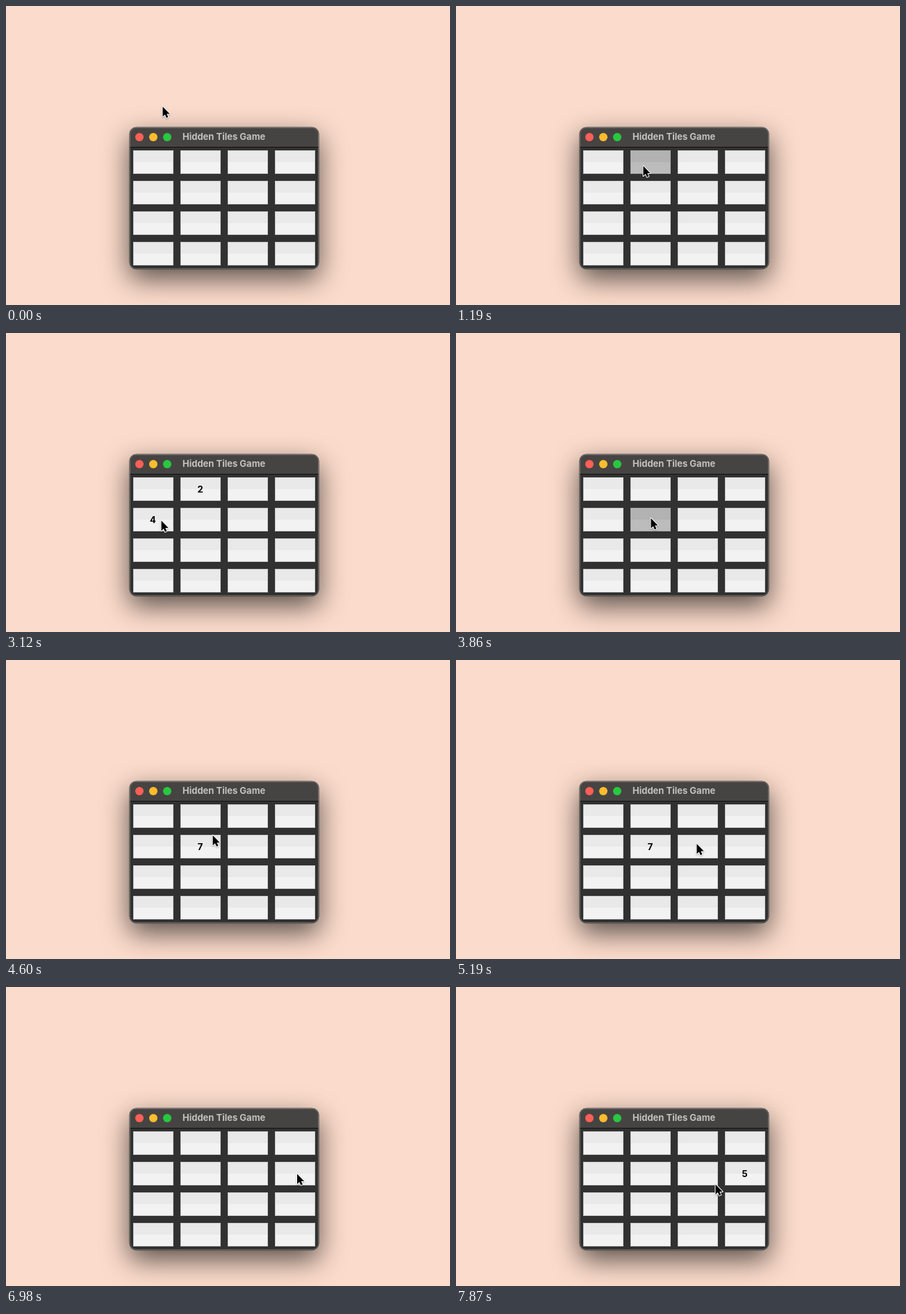
An HTML page with a canvas that plays this animation: 639x431 px, repeating every 8000 ms.

```html
<!DOCTYPE html>
<html lang="en">
<head>
<meta charset="utf-8">
<title>Hidden Tiles Game</title>
<style>
html, body { margin: 0; width: 100%; height: 100%; overflow: hidden; background: #fbdbcb; }
canvas { display: block; }
</style>
</head>
<body>
<canvas id="stage" width="639" height="431"></canvas>
<script>
const ctx = document.getElementById('stage').getContext('2d');
const LOOP = 8000, STEP = 148;
const FONT = 'bold 13px Inter, sans-serif';
const START = [225.5, 145];

// Pointer moves: start time, number of steps, target, upward bend
const moves = [
  { at: 600, steps: 4, to: [269.5, 230.5], bend: 0 },
  { at: 1640, steps: 4, to: [209.5, 271.5], bend: 0 },
  { at: 2830, steps: 7, to: [280.5, 267], bend: 0 },
  { at: 4450, steps: 6, to: [346.5, 265], bend: 18 },
  { at: 6530, steps: 4, to: [419, 269.5], bend: 0 },
  { at: 7870, steps: 1, to: [373.5, 284.5], bend: 0 }
];

// Clicked tiles: pressed, released showing a digit, then hidden again
const clicks = [
  { col: 1, row: 0, digit: 2, press: 1190, release: 1340, hide: 3130 },
  { col: 0, row: 1, digit: 4, press: 2230, release: 2380, hide: 3130 },
  { col: 1, row: 1, digit: 7, press: 3860, release: 4000, hide: 6240 },
  { col: 2, row: 1, digit: 3, press: 5340, release: 5490, hide: 6240 },
  { col: 3, row: 1, digit: 5, press: 7130, release: 7280, hide: LOOP }
];

const arrow = new Path2D('M0 0V14.6L3.3 11.5L5.4 16.2L7.9 15.1L5.8 10.5H10.2Z');

function fillRect(x, y, w, h, color) {
  ctx.fillStyle = color;
  ctx.fillRect(x, y, w, h);
}

function roundedPath(x, y, w, h, r) {
  ctx.beginPath();
  ctx.roundRect(x, y, w, h, r);
}

function text(label, x, y, color, align) {
  ctx.font = FONT;
  ctx.textAlign = align;
  ctx.fillStyle = color;
  ctx.fillText(label, x, y);
}

function drawWindow() {
  ctx.save();
  ctx.shadowColor = 'rgba(0,0,0,.64)';
  ctx.shadowBlur = 38;
  ctx.shadowOffsetY = 14;
  roundedPath(177.5, 174.5, 273, 205, 10);
  ctx.fillStyle = '#2b2a2a';
  ctx.fill();
  ctx.restore();

  ctx.save();
  roundedPath(178, 175, 272, 204, 9.5);
  ctx.clip();
  fillRect(178, 175, 272, 204, '#313131');
  fillRect(178, 175, 272, 28, '#464442');
  fillRect(178, 203, 272, 1, '#121212');
  ctx.restore();

  roundedPath(178.5, 175.5, 271, 203, 9);
  ctx.strokeStyle = 'rgba(255,255,255,.25)';
  ctx.lineWidth = 1;
  ctx.stroke();

  ['#ff5f57', '#febc2e', '#28c840'].forEach((color, i) => {
    ctx.beginPath();
    ctx.arc(192 + 20 * i, 189, 6, 0, 7);
    ctx.fillStyle = color;
    ctx.fill();
  });
  text('Hidden Tiles Game', 254, 193, '#c3c1c0', 'left');
}

function drawTile(col, row, t) {
  const x = 183 + 68 * col, y = 208 + 44 * row;
  const click = clicks.find(c => c.col === col && c.row === row);
  const pressed = click && t >= click.press && t < click.release;
  fillRect(x, y, 58, 34, pressed ? '#a8a8a8' : '#c9c9c9');
  fillRect(x + 1, y + 1, 56, 32, pressed ? '#bcbcbc' : '#f2f2f2');
  fillRect(x + 1, y + 1, 56, 16, pressed ? '#b2b2b2' : '#e9e9e9');
  if (click && t >= click.release && t < click.hide) {
    text(click.digit, x + 28.5, y + 22, '#000', 'center');
  }
}

function pointerAt(t) {
  let [x, y] = START;
  for (const { at, steps, to, bend } of moves) {
    if (t < at) break;
    const f = Math.min(1, (Math.floor((t - at) / STEP) + 1) / steps);
    const eased = f * f * (3 - 2 * f);
    x += (to[0] - x) * eased;
    y += (to[1] - y) * eased - bend * 4 * eased * (1 - eased);
  }
  return [x, y];
}

function drawPointer(t) {
  ctx.save();
  ctx.translate(...pointerAt(t));
  ctx.shadowColor = 'rgba(0,0,0,.3)';
  ctx.shadowBlur = 2;
  ctx.shadowOffsetY = 1;
  ctx.lineWidth = 2;
  ctx.lineJoin = 'round';
  ctx.strokeStyle = '#fff';
  ctx.stroke(arrow);
  ctx.shadowColor = 'transparent';
  ctx.fillStyle = '#000';
  ctx.fill(arrow);
  ctx.restore();
}

function draw(now) {
  const t = now % LOOP;
  fillRect(0, 0, 639, 431, '#fbdbcb');
  drawWindow();
  for (let row = 0; row < 4; row++) {
    for (let col = 0; col < 4; col++) drawTile(col, row, t);
  }
  drawPointer(t);
}

const begin = performance.now();
function tick() {
  draw(performance.now() - begin);
  requestAnimationFrame(tick);
}
tick();
</script>
</body>
</html>
```
